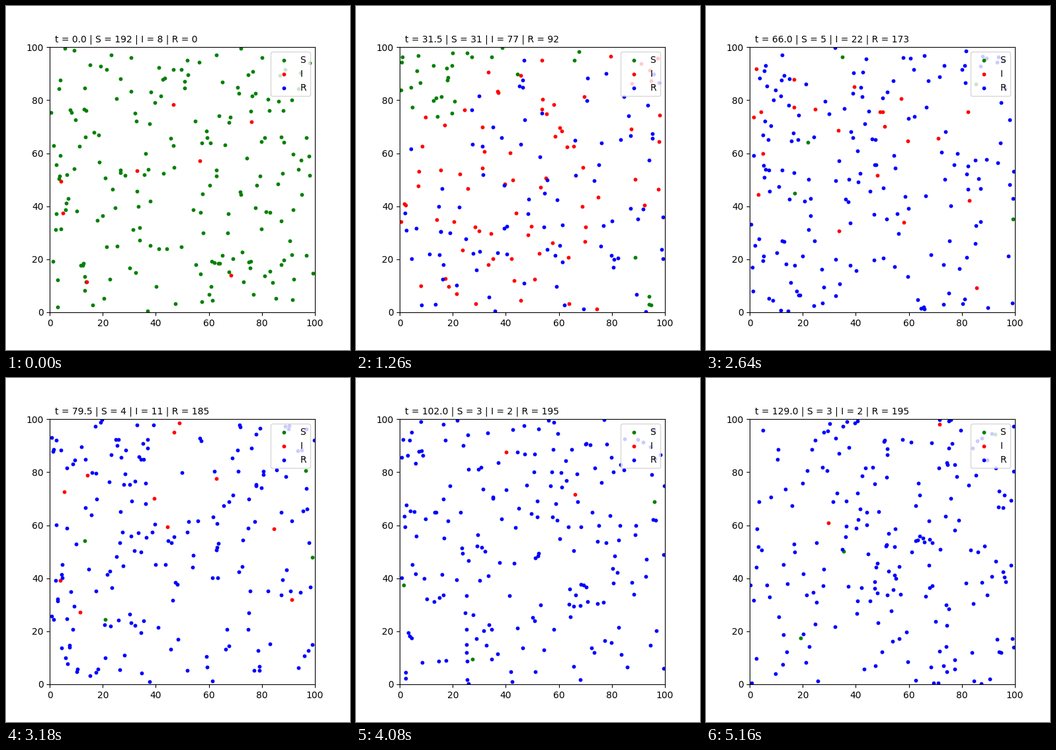
Write a matplotlib script that moves like this. It is 520 by 520 pixels and loops after 5220 ms.

```python
import numpy as np
import matplotlib.pyplot as plt
from matplotlib.animation import FuncAnimation

N, SIZE, FRAMES, DT = 200, 100, 87, 1.5
rng = np.random.default_rng(7)

# Course of the epidemic: day, susceptible, infected
DAYS, S_COUNT, I_COUNT = np.array([
    (0, 192, 8), (10, 160, 32), (20, 74, 88), (31.5, 31, 77), (46.5, 8, 53),
    (66, 5, 22), (79.5, 4, 11), (102, 3, 2), (129, 3, 2),
]).T

# Two who never catch it and one who never recovers: x, y, vx, vy
LASTING = np.array([(65, 86.9, -0.652, 0.741),
                    (2.4, 55.6, -0.293, 1.509),
                    (78.1, 47.9, -1.16, 0.39)])
IMMUNE, CHRONIC = [0, 1], [2]
CARRIERS = [(4.2, 49.4), (5, 37.4), (14, 11.4), (33, 53.5),
            (46.7, 78.4), (56.6, 57.1), (76, 71.9), (68.4, 14)]


def counts(t):
    s = round(np.interp(t, DAYS, S_COUNT))
    i = round(np.interp(t, DAYS, I_COUNT))
    return s, i, N - s - i


def make_walkers():
    pos = rng.uniform(0, SIZE, (N, 2))
    angle = rng.uniform(0, 2 * np.pi, N)
    speed = rng.uniform(0.9, 1.6, N)
    vel = speed[:, None] * np.column_stack([np.cos(angle), np.sin(angle)])
    k = len(LASTING)
    pos[:k], vel[:k] = LASTING[:, :2], LASTING[:, 2:]
    pos[k:k + len(CARRIERS)] = CARRIERS
    return pos, vel


START, VEL = make_walkers()


def place(t):
    """Straight flight, mirrored at the walls."""
    return SIZE - np.abs((START + VEL * t) % (2 * SIZE) - SIZE)


def spread():
    """State of every walker (0 S, 1 I, 2 R) at each step."""
    state = np.zeros(N, int)
    k = len(LASTING)
    state[k:k + len(CARRIERS)] = 1
    heal = rng.exponential(20, N)
    heal[CHRONIC] = np.inf
    history = [state.copy()]
    for step in range(1, FRAMES):
        t = step * DT
        s, i, _ = counts(t)

        # those nearest to a carrier catch it first
        pos = place(t)
        sick = pos[state == 1]
        gap = np.linalg.norm(pos[:, None] - sick, axis=2).min(axis=1)
        gap[IMMUNE] = np.inf
        well = np.flatnonzero(state == 0)
        caught = well[np.argsort(gap[well])][:max(0, len(well) - s)]
        state[caught] = 1
        heal[caught] += t

        ill = np.flatnonzero(state == 1)
        state[ill[np.argsort(heal[ill])][:max(0, len(ill) - i)]] = 2
        history.append(state.copy())
    return history


STATES = spread()

fig, ax = plt.subplots(figsize=(5.2, 5.2), dpi=100)
dots = [ax.scatter([], [], s=10, color=c, label=name)
        for name, c in zip("SIR", ("green", "red", "blue"))]
ax.set_xlim(0, SIZE)
ax.set_ylim(0, SIZE)
ax.set_aspect("equal")
ax.legend(loc="upper right")
title = ax.text(2, 102, "")


def draw(step):
    t = step * DT
    pos = place(t)
    for kind, group in enumerate(dots):
        group.set_offsets(pos[STATES[step] == kind])
    s, i, r = counts(t)
    title.set_text(f"t = {t:.1f} | S = {s} | I = {i} | R = {r}")
    return [*dots, title]


anim = FuncAnimation(fig, draw, frames=FRAMES, interval=60, repeat=True)
plt.show()
```
